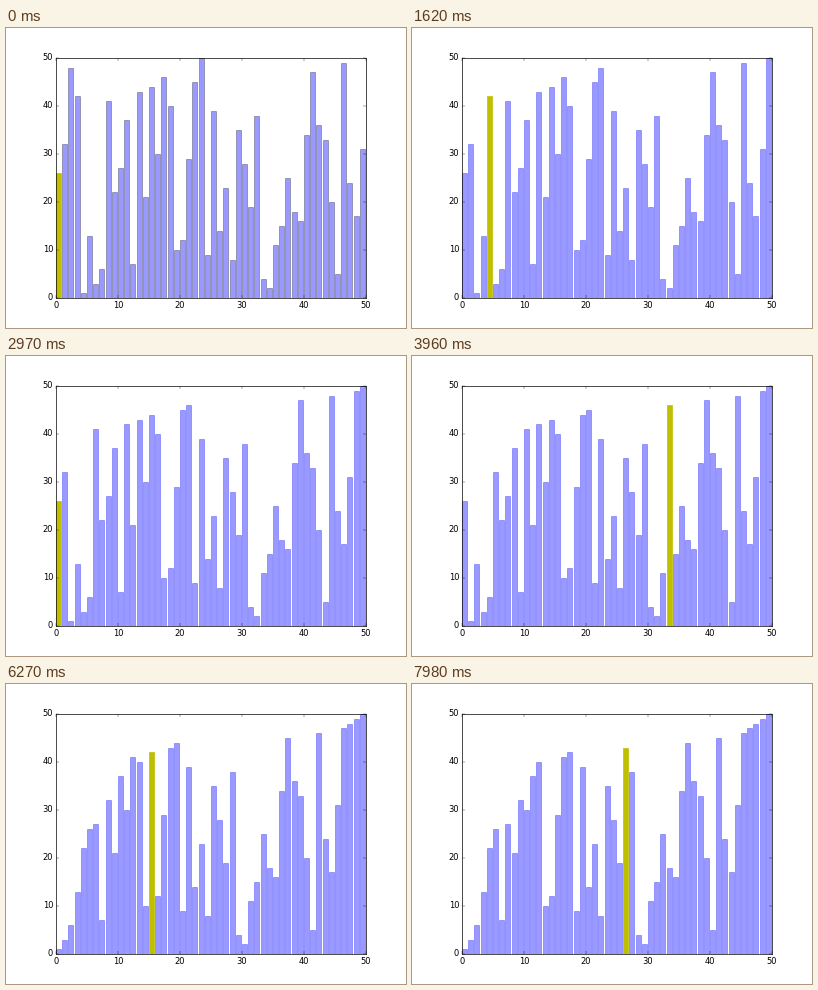
These frames come from a looping animation (400 px wide and 300 px high, 8 s). A matplotlib script:

```python
import matplotlib.pyplot as plt
from matplotlib.animation import FuncAnimation

LOOP_MS = 8000
FRAMES = 267
BLUE = (0, 0, 1, 0.4)
BLACK = (0, 0, 0, 0.4)
YELLOW = (0.75, 0.75, 0, 1)

START = [
    26, 32, 48, 42, 1, 13, 3, 6, 41, 22, 27, 37, 7, 43, 21, 44, 30,
    46, 40, 10, 12, 29, 45, 50, 9, 39, 14, 23, 8, 35, 28, 19, 38, 4,
    2, 11, 15, 25, 18, 16, 34, 47, 36, 33, 20, 5, 49, 24, 17, 31,
]

plt.rcParams.update({
    "font.family": "DejaVu Sans",
    "font.size": 12,
    "savefig.dpi": "figure",
    "savefig.facecolor": "white",
    "axes.linewidth": 1.0,
    "axes.axisbelow": False,
    "ytick.alignment": "center",
})


def bubble_sort(values):
    """Yield (values, cursor) before every comparison of every pass."""
    values = list(values)
    for end in range(len(values) - 1, 0, -1):
        for j in range(end + 1):
            yield list(values), j
            if j < end and values[j] > values[j + 1]:
                values[j], values[j + 1] = values[j + 1], values[j]


steps = [step for step, _ in zip(bubble_sort(START), range(FRAMES))]
count = len(START)

fig = plt.figure(figsize=(8, 6), dpi=50, facecolor="white")
ax = fig.add_axes([0.125, 0.1, 0.775, 0.8])
bars = ax.bar(range(count), START, width=0.8, align="edge", linewidth=1.0,
              facecolor=BLUE, edgecolor=BLACK)
ax.set(xlim=(0, count), ylim=(0, 50),
       xticks=range(0, 51, 10), yticks=range(0, 51, 10))
ax.tick_params(direction="in", top=True, right=True,
               length=4, width=0.5, pad=4, labelsize=12)


def draw(n):
    values, cursor = steps[n]
    for i, (bar, value) in enumerate(zip(bars, values)):
        bar.set_height(value)
        if i == cursor:
            face = edge = YELLOW
        else:
            # bars keep their dark outline until the cursor first passes
            face, edge = BLUE, BLACK if i > n else BLUE
        bar.set_facecolor(face)
        bar.set_edgecolor(edge)
    return list(bars)


anim = FuncAnimation(fig, draw, frames=FRAMES, interval=LOOP_MS / FRAMES,
                     init_func=lambda: draw(0), repeat=True, repeat_delay=0,
                     blit=False)
plt.show()
```
